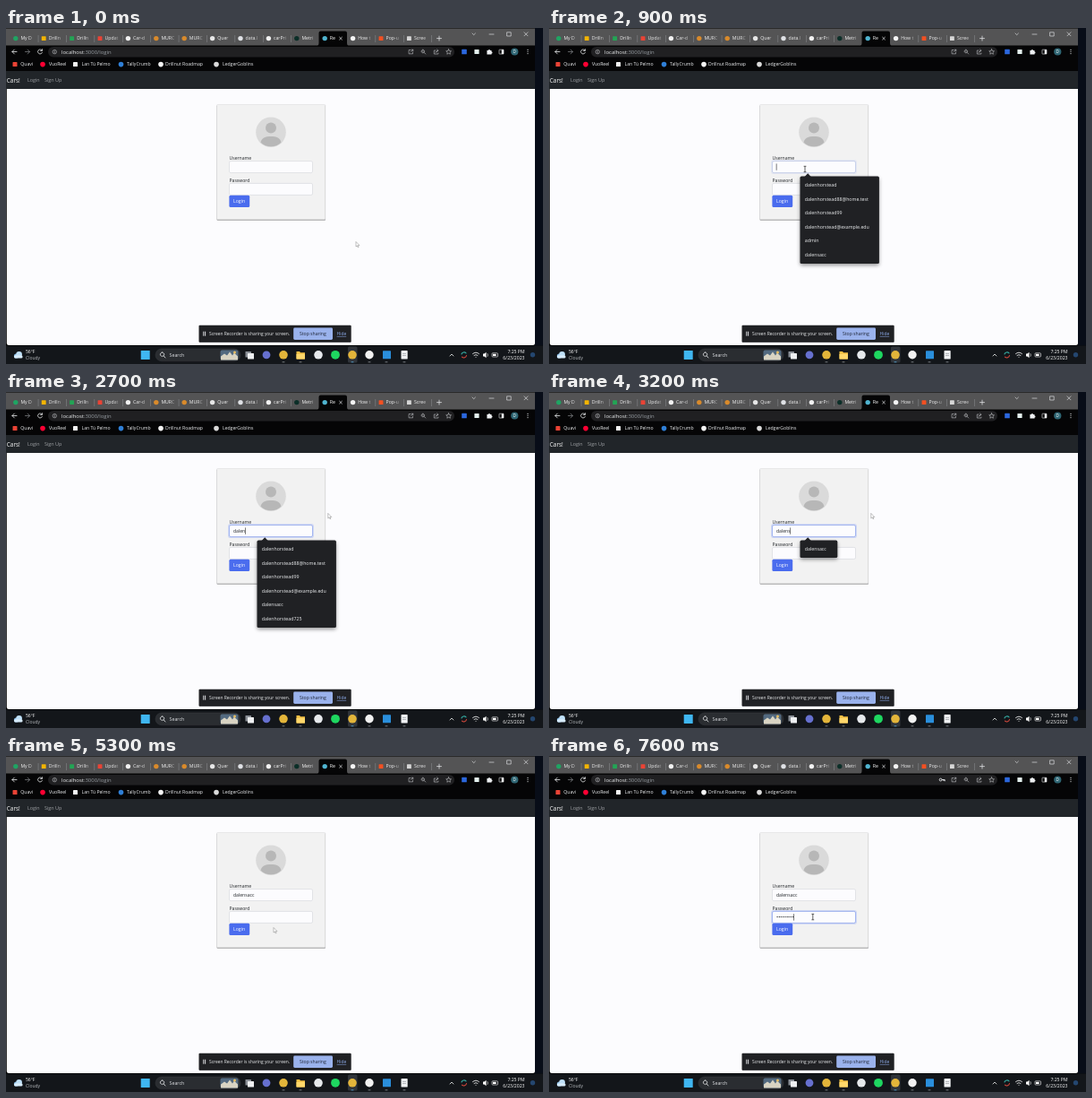
An HTML page for the animation above (8000 ms loop, 600 by 375 pixels).

```html
<!DOCTYPE html>
<html lang="en">
<head>
<meta charset="utf-8">
<title>Login</title>
<style>
  html, body { margin: 0; width: 100%; height: 100%; overflow: hidden; background: #000; }
  svg { display: block; width: 100vw; height: 100vh; }
  text { font-family: "Open Sans", "Noto Sans", sans-serif; white-space: pre; }
</style>
</head>
<body>
<svg id="stage" viewBox="0 0 600 375" preserveAspectRatio="none"></svg>
<script>
const LOOP = 8000, STEP = 100;
const FRAME = '#545455', BAR = '#050506', DARK = '#202124', PALE = '#eef0f2', INK = '#212529';

// Markup helpers; text is placed by its left edge and vertical centre.
const text = (x, y, s, size, fill, more = '') =>
  `<text x="${x}" y="${y + size * 0.36}" font-size="${size}" fill="${fill}" ${more}>${s}</text>`;
const rect = (x, y, w, h, fill, r = 0, more = '') =>
  `<rect x="${x}" y="${y}" width="${w}" height="${h}" rx="${r}" fill="${fill}" ${more}/>`;
const dot = (x, y, r, fill, more = '') => `<circle cx="${x}" cy="${y}" r="${r}" fill="${fill}" ${more}/>`;
const square = (x, y, size, fill) => rect(x - size / 2, y - size / 2, size, size, fill, 0.6);
const line = (d, stroke = PALE, w = 0.8) =>
  `<path d="${d}" fill="none" stroke="${stroke}" stroke-width="${w}" stroke-linecap="round" stroke-linejoin="round"/>`;

const defs = `<defs>
  <linearGradient id="fade"><stop offset="0" stop-color="${FRAME}" stop-opacity="0"/><stop offset="1" stop-color="${FRAME}"/></linearGradient>
  <filter id="soft" x="-20%" y="-20%" width="140%" height="150%"><feGaussianBlur stdDeviation="2"/></filter>
  <filter id="edge" x="-5%" y="-5%" width="110%" height="110%"><feGaussianBlur stdDeviation=".6"/></filter>
</defs>`;

const ACTIVE = 11;
const tabs = [
  ['My D', '#1fa463', 1], ['Drilln', '#f4b400'], ['Drilln', '#23a455'], ['Updat', '#ea4335'],
  ['Car-d', '#f1f1f1', 1], ['MURC', '#d98a2b', 1], ['MURC', '#d98a2b', 1], ['Quer', '#e6e6e6', 1],
  ['data.l', '#dfe1e5', 1], ['carPri', '#f1f1f1', 1], ['Metri', '#0b2f28', 1], ['Re', '#4fb3cf', 1],
  ['How t', '#f4f4f4', 1], ['Pop-u', '#f25022'], ['Scree', '#d6d6d6']
];

function tabStrip() {
  let out = rect(0, 0.5, 591, 19.2, FRAME);
  tabs.forEach(([label, color, round], i) => {
    const x = 10.8 + 31.4 * i, on = i === ACTIVE;
    if (on) out += `<path d="M348 20Q349.5 19 349.5 17V5.500Q349.5 3.500 351.5 3.500H379Q381 3.500 381 5.500V17Q381 19 382.5 20Z" fill="${BAR}"/>`;
    out += round ? dot(x, 11.6, 2.7, color) : square(x, 11.6, 4.9, color);
    out += text(x + 5.6, 11.6, label, 5.2, on ? '#fff' : '#f2f2f2');
    if (on) out += line('M372.6 10.2l2.8 2.8m0-2.8l-2.8 2.8', PALE, 0.7);
    else out += rect(x + 15, 6, 8, 11, 'url(#fade)');
    if (!on && i !== ACTIVE - 1) out += rect(x + 25, 8, 0.5, 8, '#8d8f92');
  });
  return out + line('M481.5 11.6h5M484 9.1v5', PALE, 0.7)
    + line('M521 6l1.7 1.7 1.7-1.7M540 7h5M579 4.8l4 4m0-4l-4 4M560 4.8h4.2v4.2h-4.2z', PALE, 0.6);
}

function toolbar() {
  return rect(0, 19.7, 591, 28.6, BAR)
    + line('M12 26.5H7m2.3-2.4L6.9 26.5l2.4 2.4')
    + line('M21.5 26.5h5m-2.3-2.4l2.4 2.4-2.4 2.4', '#77797d')
    + line('M40.2 25a2.5 2.5 0 1 0 .2 2.5M40.4 23.6v1.8h-1.8')
    + rect(47, 20.9, 454, 11.6, '#202022', 5.8)
    + dot(54.3, 26.6, 2.2, 'none', 'stroke="#c4c7ca" stroke-width=".6"')
    + line('M54.3 26.4v1.3M54.3 25.3v.1', '#c4c7ca', 0.6)
    + text(62, 26.6, 'localhost<tspan fill="#9aa0a6">:3000/login</tspan>', 5.95, PALE)
    + line('M452 24.5h-1.9v4.3h4.4V27M452.2 26.6l2.6-2.4m-1.6 0h1.6v1.6', '#c4c7ca', 0.6)
    + line('M465.8 24.2a1.8 1.8 0 1 0 .1 0M467.2 27.4l1.6 1.6M465 26h1.6', '#c4c7ca', 0.6)
    + line('M480 25h-1.7v4h4.6v-1M480 27.4q.4-2.2 2.8-2.2m-1.2-1.3l1.4 1.3-1.4 1.3', '#c4c7ca', 0.6)
    + line('M494.6 23.7l.9 1.9 2 .2-1.5 1.4.4 2-1.8-1-1.8 1 .4-2-1.5-1.4 2-.2z', '#c4c7ca', 0.6)
    + square(512, 26.5, 5.6, '#2b67dd') + square(526, 26.5, 5.2, '#e4f1ef')
    + `<path d="M537.4 25h1.5a1 1 0 0 1 2 0h1.6v1.5a1 1 0 0 1 0 2v1h-5.1z" fill="${PALE}"/>`
    + rect(551, 24.2, 5, 4.8, 'none', 0.4, `stroke="${PALE}" stroke-width=".6"`) + rect(553.7, 24.2, 2.3, 4.8, PALE)
    + dot(568.3, 26.5, 4.1, '#2f6674') + text(568.3, 26.5, 'D', 4.6, '#fff', 'text-anchor="middle"')
    + [24.4, 26.5, 28.6].map(y => dot(583, y, 0.55, PALE)).join('');
}

const bookmarks = [
  [10, 16.3, 'Quavi', '#ea4335'], [41, 48, 'VuoReel', '#f03', 1], [77.5, 84.5, 'Lan Tú Pelmo', '#f4f4f4'],
  [128.5, 135, 'TallyCrumb', '#2f7fd6', 1], [173, 178, 'Drillnut Roadmap', '#f4f4f4', 1], [235, 242, 'LedgerGoblins', '#dadada', 1]
];
const bookmarkBar = () => bookmarks.map(([ix, x, label, color, round]) =>
  (round ? dot(ix, 40.6, 2.8, color) : square(ix, 40.6, 5, color)) + text(x, 40.6, label, 5.1, PALE)).join('');

const fields = { user: 148.6, pass: 173.4 };
const FX = 249.5, FW = 93, FH = 13;
const field = id => {
  const y = fields[id];
  return rect(FX - 0.8, y - 0.8, FW + 1.6, FH + 1.6, 'none', 2.2, `id="${id}Ring" stroke="#6f8ff5" stroke-opacity=".26" stroke-width="1.4"`)
    + rect(FX, y, FW, FH, '#fcfcfe', 1.6, 'stroke="#d3d6da" stroke-width=".6"')
    + rect(FX, y, FW, FH, 'none', 1.6, `id="${id}Edge" stroke="#8aa4f5" stroke-width=".7"`);
};

function page() {
  return rect(0.8, 60, 590.2, 293.9, '#fcfcfe', 2.5) + rect(0, 48, 591, 20, '#212529')
    + text(0.8, 58.6, 'Cars!', 6.4, '#fff')
    + text(24, 58.3, 'Login', 5.4, '#a0a3a6') + text(43, 58.3, 'Sign Up', 5.4, '#a0a3a6')
    + rect(235.5, 86.2, 121.5, 128.6, '#000', 1, 'opacity=".4" filter="url(#edge)"')
    + rect(235.5, 85.5, 121.3, 128.3, '#f2f2f2', 1, 'stroke="#d6d6d8" stroke-width=".5"')
    + dot(296, 116.3, 16.8, '#dadada') + dot(296, 111.5, 6, '#b7b7b7')
    + '<path d="M284.6 127.8C285 122.8 290 120.9 296 120.9S307 122.8 307.4 127.8Q302.6 132.3 296 132.3T284.6 127.8Z" fill="#b7b7b7"/>'
    + text(249.5, 144.8, 'Username', 5.1, INK) + text(249.5, 169.7, 'Password', 5.1, INK)
    + field('user') + field('pass')
    + rect(249.4, 186.7, 22.8, 13.2, '#4a6cee', 1.5) + text(254, 193.6, 'Login', 5.2, '#fff')
    + text(254, 155.2, '', 5.1, INK, 'id="userText"')
    + text(254, 180, '', 5.8, INK, 'id="passText"')
    + rect(0, 0, 0.6, 7.4, '#222', 0, 'id="caret"');
}

function shareBar() {
  return rect(215.6, 332.4, 170, 18.6, '#000', 1, 'opacity=".35" filter="url(#edge)"')
    + rect(215.6, 331.8, 170, 18.9, DARK, 0.8)
    + rect(220.3, 338.7, 0.9, 5, PALE) + rect(222.2, 338.7, 0.9, 5, PALE)
    + text(227, 341.3, 'Screen Recorder is sharing your screen.', 4.93, PALE)
    + rect(321.2, 334.6, 43.8, 13.4, '#9ab2ec', 1.4) + text(328, 341.3, 'Stop sharing', 5.1, '#1c2232')
    + text(369.6, 341.3, 'Hide', 4.9, '#8faeee', 'text-decoration="underline"');
}

function taskbar() {
  const running = [310, 329, 387, 406, 425, 445];
  const apps = [[291, '#6670cf', 4.4], [310, '#e3b53a', 4.8], [349, '#e6e9ec', 4.8], [368, '#1ed760', 4.9], [387, '#e3b53a', 4.8], [406, '#f2f2f2', 4.7]];
  return rect(0, 354.5, 600, 20.5, '#13161a')
    + dot(11.5, 366, 2.6, '#8fc4ee') + dot(14.6, 364.3, 3.3, '#bfe0f8') + rect(9, 365.2, 9.6, 3.4, '#d8ecfa', 1.7)
    + text(22, 361.2, '56°F', 5, '#fff') + text(22, 368.3, 'Cloudy', 5, '#b9bcc0')
    + square(155.7, 365, 10, '#3fb6f2')
    + rect(167, 358, 95, 13.8, '#2a2d31', 6.9, 'stroke="#3d4146" stroke-width=".4"')
    + line('M174.5 362a2.2 2.2 0 1 0 .1 0M176.2 366l1.8 2')
    + text(182.5, 365, 'Search', 5.3, '#dfe1e4')
    + rect(239.5, 359.5, 20, 11, '#536a80', 2)
    + '<path d="M240 370.5v-4l4-3 3 2 3-4 3 4 2-3 4 4v4z" fill="#d9d4c3"/>' + dot(255.5, 362, 1.5, '#e6bd62')
    + rect(267.5, 361, 6.5, 6.5, '#8b9097', 0.5) + rect(270, 363, 7, 6.5, '#eef0f2', 0.5)
    + rect(382, 355.5, 10.5, 18, '#30343a', 1.5)
    + apps.map(([x, c, r]) => dot(x, 364.8, r, c)).join('')
    + '<path d="M324.5 361h3.5l1 1.2h5v7.2h-9.5z" fill="#f2bf42"/>' + rect(324.5, 363.8, 9.5, 5.6, '#ffd86b', 0.6)
    + square(425.5, 364.8, 9, '#2a8fdc')
    + rect(441.5, 360, 7.2, 9.6, '#f0f2f4', 0.7) + rect(443, 363, 4, 0.6, '#8b9097') + rect(443, 365, 4, 0.6, '#8b9097')
    + running.map(x => rect(x - 1.5, 372.4, 3, 0.9, x === 387 ? '#5bb8ef' : '#9a9ea4', 0.4)).join('')
    + line('M496 366l2-2 2 2')
    + line('M509 364a3 3 0 0 1 5-1.2', '#36a9a0', 1.1) + line('M514.5 365.5a3 3 0 0 1-5 1.6', '#d94a3f', 1.1)
    + line('M521.5 363.6q3.5-3 7 0M523 365.4q2-1.7 4 0M525 367.3v.1', '#fff', 0.8)
    + '<path d="M533 363.6h1.5l2-1.8v6.4l-2-1.8H533z" fill="#fff"/>' + line('M538 363.5q1 1.5 0 3', '#fff', 0.6)
    + rect(543, 362.8, 6.5, 4.2, 'none', 0.8, 'stroke="#fff" stroke-width=".6"') + rect(544, 363.8, 3.6, 2.2, '#fff')
    + text(579.5, 361.2, '7:25 PM', 5.1, '#fff', 'text-anchor="end"') + text(579.5, 368.3, '6/23/2023', 5.1, '#fff', 'text-anchor="end"')
    + dot(588.5, 364.8, 2.7, '#24466f');
}

const BASE = 'dalenhorstead', SHORT = 'dalensacc';
const allNames = [BASE, BASE + '88@home.test', BASE + '99', BASE + '@example.edu', 'admin', SHORT];
const matches = [...allNames.slice(0, 4), SHORT, BASE + '725'];

const menu = (id, names, w, h) => `<g id="${id}">`
  + rect(280.5, 167.5, w, h, '#000', 2, 'opacity=".4" filter="url(#soft)"')
  + rect(280.5, 165.6, w, h, DARK, 1.6) + `<path d="M285.6 166l3.6-3.7 3.6 3.7z" fill="${DARK}"/>`
  + names.map((n, i) => text(285.8, 175.2 + 15.6 * i, n, 5.25, PALE)).join('') + '</g>';

const keyIcon = '<g id="key">' + dot(437.6, 26.5, 1.4, 'none', 'stroke="#e8eaed" stroke-width=".9"')
  + line('M439.2 26.5h3v1.3m-1.2-1.3v1', PALE, 0.9) + '</g>';
const pointers = '<path id="arrow" d="M0 0v5.6l1.3-1.2.9 2 .9-.4-.9-1.9h1.8z" fill="#fff" stroke="#666" stroke-width=".4"/>'
  + '<path id="beam" d="M-1.4-3.2H1.4M0-3.2V3.2M-1.4 3.2H1.4" stroke="#222" stroke-width=".7"/>';

document.getElementById('stage').innerHTML = defs + rect(0, 0, 600, 375, '#000') + rect(591, 0, 9, 354.5, '#080d18')
  + tabStrip() + toolbar() + keyIcon + bookmarkBar() + page() + shareBar() + taskbar()
  + menu('menuAll', allNames, 88.4, 97.4) + menu('menuMatch', matches, 88.4, 97.4) + menu('menuOne', [SHORT], 41.8, 19.4) + pointers;

const $ = id => document.getElementById(id);
const show = (id, on) => $(id).setAttribute('visibility', on ? 'visible' : 'hidden');

const USER_ON = 900, USER_OFF = 5000, PASS_ON = 5600;
const userKeys = [2200, 2300, 2400, 2500, 2700, 3200, 3500, 3800, 4000];
const passKeys = [6200, 6300, 6400, 6600, 6700, 6900, 7300, 7500, 7600];
const path = [
  [0, 391, 238.5], [300, 391, 238.5], [700, 286, 157.5], [1300, 286, 157.5], [1600, 359.8, 135.4],
  [4400, 359.8, 135.4], [4500, 348, 144.2], [4800, 300, 187.4], [5200, 300, 187.4], [5300, 299, 191.5],
  [5600, 294.8, 179.6], [LOOP, 294.8, 179.6]
];

function pointerAt(t) {
  const i = path.findIndex(p => p[0] > t), [t0, x0, y0] = path[i - 1], [t1, x1, y1] = path[i];
  const k = (t - t0) / (t1 - t0);
  return [x0 + (x1 - x0) * k, y0 + (y1 - y0) * k];
}

const inField = (x, y) => x > FX && x < FX + FW && Object.values(fields).some(top => y > top && y < top + FH);
const ramp = (t, from) => t < from ? 0 : Math.min(1, (t - from + 60) / 150);
const typed = (keys, t) => keys.filter(k => k <= t).length;

function glow(id, amount) {
  $(id + 'Ring').setAttribute('opacity', amount);
  $(id + 'Edge').setAttribute('opacity', amount);
}

function render(t) {
  const n = typed(userKeys, t), m = typed(passKeys, t);
  $('userText').textContent = SHORT.slice(0, n);
  $('passText').textContent = '•'.repeat(m);
  glow('user', ramp(t, USER_ON) - ramp(t, USER_OFF));
  glow('pass', ramp(t, PASS_ON));

  show('menuAll', t >= USER_ON && n === 0);
  show('menuMatch', n > 0 && n < 6);
  show('menuOne', n >= 6 && n < 9);
  show('key', m > 0);

  const onPass = t >= PASS_ON, focused = onPass || (t >= USER_ON && t < USER_OFF);
  const last = onPass ? passKeys[m - 1] || PASS_ON : userKeys[n - 1] || USER_ON;
  const blink = Math.floor((t - last) / 500) % 2 === 0;
  const label = $(onPass ? 'passText' : 'userText');
  const width = label.textContent ? label.getComputedTextLength() : 0;
  show('caret', focused && blink);
  $('caret').setAttribute('x', 253.8 + width);
  $('caret').setAttribute('y', (onPass ? fields.pass : fields.user) + 2.8);

  const [x, y] = pointerAt(t), beam = inField(x, y);
  show('beam', beam);
  show('arrow', !beam);
  $(beam ? 'beam' : 'arrow').setAttribute('transform', `translate(${x} ${y})`);
}

function tick() {
  render(Math.floor(performance.now() % LOOP / STEP) * STEP);
  requestAnimationFrame(tick);
}
tick();
</script>
</body>
</html>
```
